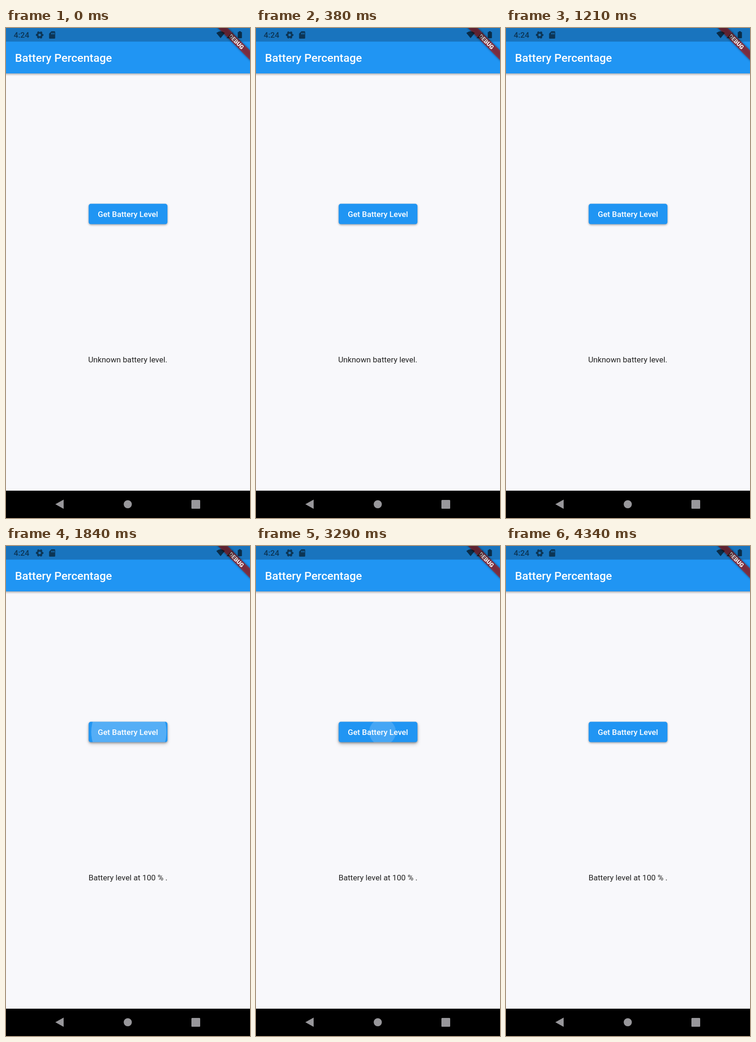
An HTML page that plays this animation: 529 px wide and 1058 px high, repeating every 4.39 s.

```html
<!DOCTYPE html>
<html lang="en">
<head>
<meta charset="utf-8">
<title>Battery Percentage</title>
<style>
  html, body { margin: 0; width: 100%; height: 100%; overflow: hidden; background: #f8f8fb; }
  svg { display: block; width: 100vw; height: 100vh; font-family: Roboto, sans-serif; }
  .title { font-size: 24.5px; font-weight: 500; fill: #fff; }
  .label { font-size: 17.14px; font-weight: 500; fill: #fff; text-anchor: middle; }
  .level { font-size: 17.14px; fill: #212121; text-anchor: middle; }
  .clock { font-size: 17.14px; font-weight: 500; }
  .debug { font-size: 12.5px; font-weight: 900; fill: #fff; text-anchor: middle; }

  /* The loop is 4390 ms; each tap runs the same cycle with its own delay. */
  .before { animation: before 4390ms step-end infinite; }
  .after { opacity: 0; animation: after 4390ms step-end infinite; }
  .ripple, .lift { opacity: 0; animation: ripple 4390ms linear infinite; }
  .lift { animation-name: lift; }
  .first { animation-delay: 1570ms; }
  .second { animation-delay: 3230ms; }

  @keyframes before { 0% { opacity: 1; } 38.95%, 100% { opacity: 0; } }
  @keyframes after { 0% { opacity: 0; } 38.95%, 100% { opacity: 1; } }
  @keyframes ripple {
    0% { opacity: 0; r: 26.5px; transform: translateX(10.5px); }
    1.3%, 3.3% { opacity: .17; r: 29px; transform: translateX(9.7px); }
    3.4% { opacity: .24; r: 42px; transform: translateX(8px); animation-timing-function: ease-out; }
    8.1% { opacity: .24; r: 93px; transform: none; }
    11.5%, 100% { opacity: 0; r: 93px; transform: none; }
  }
  @keyframes lift {
    0% { opacity: 0; }
    1.3%, 3.3% { opacity: .5; }
    4% { opacity: .8; }
    8.1%, 100% { opacity: 0; }
  }
</style>
</head>
<body>
<svg viewBox="0 0 529 1058" preserveAspectRatio="none">
  <defs>
    <filter id="soft" x="-20%" y="-50%" width="140%" height="200%"><feGaussianBlur stdDeviation="2"/></filter>
    <filter id="wide" x="-20%" y="-80%" width="140%" height="260%"><feGaussianBlur stdDeviation="4"/></filter>
    <rect id="box" x="179.2" y="379.5" width="170.8" height="44.1" rx="4.9"/>
    <clipPath id="clip"><use href="#box"/></clipPath>
  </defs>

  <rect width="529" height="1058" fill="#f8f8fb"/>

  <!-- App bar -->
  <rect x="-10" y="60" width="549" height="40" fill="#000" opacity=".34" filter="url(#soft)"/>
  <rect width="529" height="98" fill="#2095f3"/>
  <text class="title" x="19.6" y="73">Battery Percentage</text>

  <!-- Button -->
  <use href="#box" y="1.6" opacity=".36" filter="url(#soft)"/>
  <g class="lift first"><use href="#box" y="4.5" opacity=".4" filter="url(#wide)"/></g>
  <g class="lift second"><use href="#box" y="4.5" opacity=".4" filter="url(#wide)"/></g>
  <use href="#box" fill="#2095f3"/>
  <g clip-path="url(#clip)" fill="#fff">
    <circle class="ripple first" cx="264.5" cy="401.5" r="26.5"/>
    <circle class="ripple second" cx="264.5" cy="401.5" r="26.5"/>
  </g>
  <text class="label" x="264.3" y="408">Get Battery Level</text>

  <text class="level before" x="264" y="721.5">Unknown battery level.</text>
  <text class="level after" x="264.5" y="721.5">Battery level at 100 % .</text>

  <!-- Corner banner -->
  <g transform="translate(529 0) rotate(45)">
    <rect x="-60" y="34.3" width="120" height="14.7" fill="#000" opacity=".5" filter="url(#soft)"/>
    <rect x="-60" y="34.3" width="120" height="14.7" fill="#b71c1c" opacity=".63"/>
    <text class="debug" y="46.1">DEBUG</text>
  </g>

  <!-- Status bar -->
  <rect width="529" height="29.4" fill="#000" opacity=".22"/>
  <g fill="#0c3555">
    <text class="clock" x="16.8" y="21">4:24</text>
    <g fill="none" stroke="#0c3555">
      <circle cx="73" cy="15" r="4.7" stroke-width="3.8"/>
      <circle cx="73" cy="15" r="6.9" stroke-width="2.6" stroke-dasharray="4 3.225" stroke-dashoffset="2"/>
    </g>
    <path fill-rule="evenodd" d="M98.5 7H105q1.6 0 1.6 1.6V21.400q0 1.600-1.600 1.600H95q-1.600 0-1.600-1.600V12.200ZM98 10.500v3.300h1.600v-3.300ZM100.700 10.500v3.300h1.600v-3.300ZM103.400 10.500v3.300h1.600v-3.300Z"/>
  </g>
  <g fill="#000">
    <path opacity=".62" d="M456 10.700Q465.200 3.300 474.500 10.700L465.200 22Z"/>
    <path opacity=".2" d="M478 22L492.500 7.500V22Z"/>
    <path opacity=".5" d="M478 22L486.500 13.500V22Z"/>
    <path opacity=".62" d="M505 7h4v1.600h1.500q1 0 1 1V21q0 1-1 1h-7q-1 0-1-1V9.600q0-1 1-1H505Z"/>
  </g>

  <!-- Navigation bar -->
  <rect y="999" width="529" height="59"/>
  <g fill="#98979b">
    <path d="M107 1028.300L125 1018.300V1038.300Z"/>
    <circle cx="264" cy="1028.300" r="8.800"/>
    <rect x="402" y="1019" width="19" height="19" rx="1.500"/>
  </g>
</svg>
</body>
</html>
```
